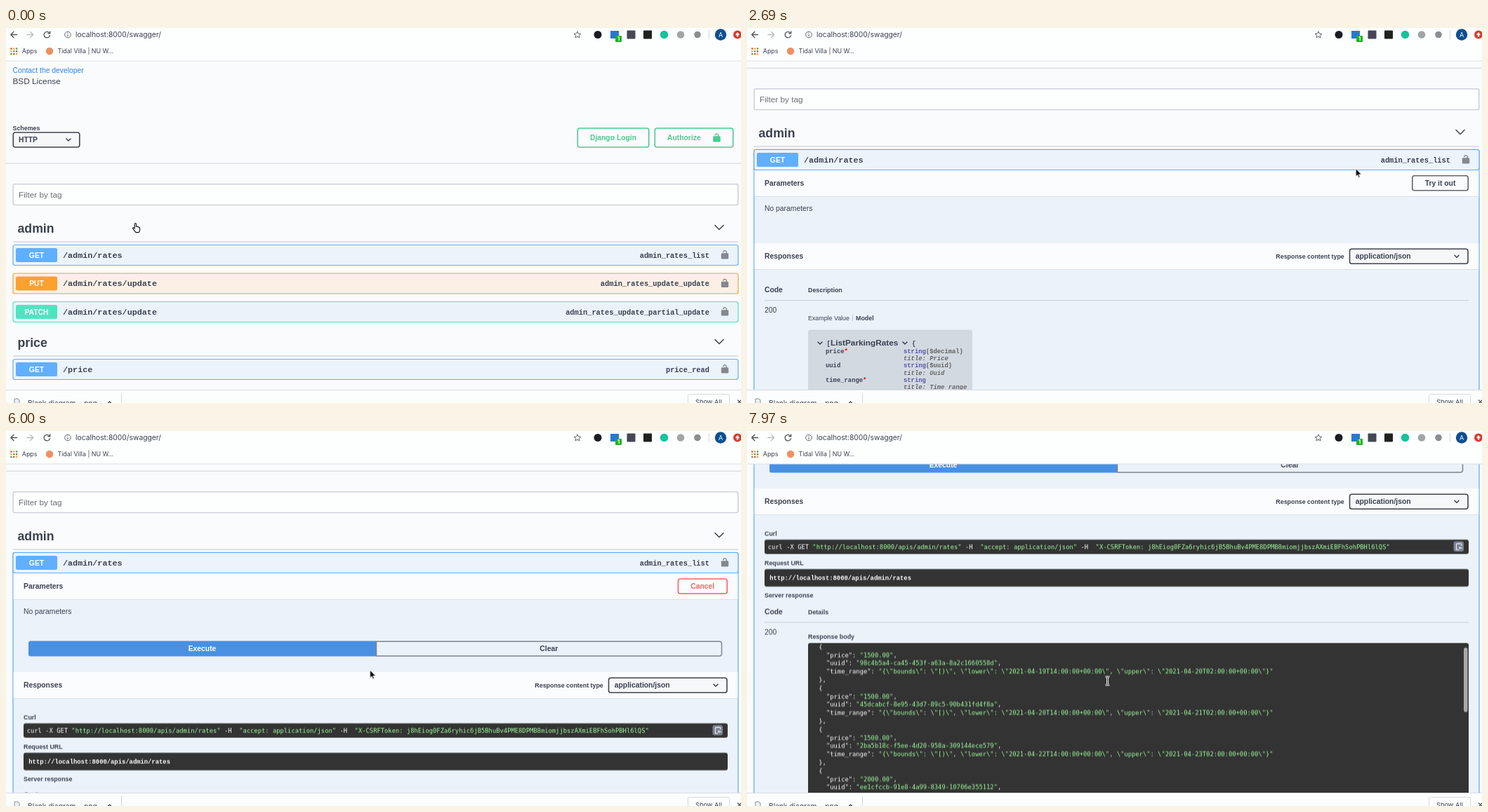
Recreate the animation shown at these times as an HTML page. Size 1047 px wide and 535 px high, loop 8000 ms.

```html
<!DOCTYPE html>
<html lang="en">
<head>
<meta charset="utf-8">
<title>API docs</title>
<style>
html, body { margin: 0; width: 100%; height: 100%; overflow: hidden; background: #fafbfc; }
svg { display: block; }
text { font: 10.35px "Liberation Sans", Arial, sans-serif; fill: #3b4151; white-space: pre; }
.b { font-weight: 700; }
.s { font-size: 8.87px; }
.m { font-size: 11.8px; }
.l { font-size: 17.7px; }
.mid { text-anchor: middle; }
.end { text-anchor: end; }
.ui { font-family: Inter, Roboto, sans-serif; }
.cou { font: 700 8.85px "Liberation Mono", "Courier New", monospace; }
.code { font: 8.82px "DejaVu Sans Mono", monospace; fill: #fff; }
.str { fill: #a2fca2; }
.type { fill: #5555aa; }
.note { fill: #666; font-style: italic; }
.white { fill: #fff; }
.line { fill: none; stroke: #3b4151; stroke-width: 1.5; stroke-linecap: round; stroke-linejoin: round; }
.dark { fill: #333; }
.bar { fill: #fbfcfe; }
.btn { fill: none; stroke: currentColor; stroke-width: 1.6; }
.cur { fill: currentColor; }
.sel { fill: #f5f7f9; stroke: #41444e; stroke-width: 1.6; }

.a { animation: 8s step-end -15ms infinite; }
#page { animation-name: scroll; }
#closed { animation-name: closed; }
#open { animation-name: open; }
#try { animation-name: try; }
#cancel { animation-name: cancel, hover; }
#exec { animation-name: exec; }
#load { animation-name: load; }
#arc { animation-name: spin; }
#resp { animation-name: shift; }
#model { animation-name: model; }
.result { animation-name: result; }
#body { animation-name: inner; }
#cursor { animation-name: move; }
#hand { animation-name: hand; }
#arrow { animation-name: arrow; }
.last { animation-name: last; }

@keyframes scroll {
  0% { transform: translateY(0); }
  1.875% { transform: translateY(-37px); }
  3.75% { transform: translateY(-50px); }
  22.5% { transform: translateY(-80px); }
  24.375% { transform: translateY(-115px); }
  26.25% { transform: translateY(-130px); }
  28.125% { transform: translateY(-136px); }
  78.625% { transform: translateY(-164px); }
  80.5% { transform: translateY(-218.5px); }
  82.75% { transform: translateY(-240px); }
  84.625% { transform: translateY(-248px); }
  88.375% { transform: translateY(-296px); }
  90.25% { transform: translateY(-352px); }
  92.125% { transform: translateY(-386px); }
  94%, to { transform: translateY(-398px); }
}
@keyframes closed { 0% { opacity: 1; } 13.125%, to { opacity: 0; } }
@keyframes open { 0% { opacity: 0; } 13.125%, to { opacity: 1; } }
@keyframes try { 0% { opacity: 1; } 46.625%, to { opacity: 0; } }
@keyframes cancel { 0% { opacity: 0; } 46.625%, to { opacity: 1; } }
@keyframes hover { 0%, 48.5%, to { color: #ff6060; } 46.625% { color: #c0444e; } }
@keyframes exec { 0%, 69.125%, to { opacity: 0; } 46.625% { opacity: 1; } }
@keyframes load { 0%, 69.125%, to { opacity: 0; } 65.25% { opacity: 1; } }
@keyframes spin { 0% { transform: rotate(29deg); } 67.125%, to { transform: rotate(83deg); } }
@keyframes shift {
  0% { transform: translateY(461.5px); }
  46.625% { transform: translateY(488px); }
  65.25% { transform: translateY(573.5px); }
  69.125%, to { transform: translateY(498.5px); }
}
@keyframes model { 0% { opacity: 1; } 69.125%, to { opacity: 0; } }
@keyframes result { 0% { opacity: 0; } 69.125%, to { opacity: 1; } }
@keyframes inner { 0% { transform: none; } 99.625%, to { transform: translateY(-17.5px); } }
@keyframes last { 0% { opacity: 0; } 99.625%, to { opacity: 1; } }
@keyframes move {
  0% { transform: translate(180px, 278px); }
  7.5% { transform: translate(180px, 278px); animation-timing-function: steps(2, jump-start); }
  11.25% { transform: translate(186px, 266px); }
  18.75% { transform: translate(244px, 311px); }
  28.125% { transform: translate(244px, 311px); animation-timing-function: steps(5, jump-start); }
  37.375% { transform: translate(1023px, 173px); animation-timing-function: steps(4, jump-start); }
  44.875% { transform: translate(971px, 216px); }
  48.5% { transform: translate(971px, 216px); animation-timing-function: steps(7, jump-start); }
  61.475% { transform: translate(535px, 301px); }
  71% { transform: translate(535px, 301px); animation-timing-function: steps(4, jump-start); }
  78.65%, to { transform: translate(513px, 354.5px); }
}
@keyframes hand { 0%, 35.5%, 57.8% { opacity: 1; } 18.75%, 48.5%, 72.9%, to { opacity: 0; } }
@keyframes arrow { 0%, 35.5%, 57.8%, 99.625%, to { opacity: 0; } 18.75%, 48.5%, 72.9% { opacity: 1; } }
</style>
</head>
<body>
<svg width="1047" height="535" viewBox="0 0 1047 535">
<defs>
  <g id="lock"><rect x="-5.2" y="-1.2" width="10.4" height="8.2" rx="1.3" class="cur"/><path d="M2.2 0V-2.8A2.3 2.5 0 0 0-2.3-2.8V-2.2" fill="none" stroke="currentColor" stroke-width="1.5"/></g>
  <path id="down" d="M-3-1.5 0 1.5 3-1.5" class="line"/>
  <path id="fold" d="M-6-3 0 3 6-3" class="line"/>
</defs>
<rect width="1047" height="535" fill="#fafbfc"/>

<svg y="47" width="1047" height="469" viewBox="0 47 1047 469">
<g id="page" class="a">
  <text x="9.5" y="63.6" style="fill:#2f82dc">Contact the developer</text>
  <text x="9.5" y="80.3" class="m">BSD License</text>
  <text x="9.5" y="146" class="s b">Schemes</text>
  <rect x="10.3" y="149" width="94.5" height="21" rx="3" class="sel"/>
  <text x="18" y="163.2" class="b">HTTP</text>
  <use href="#down" x="89" y="159.5"/>
  <g color="#49cc90">
    <rect x="814.3" y="143" width="101.4" height="27" rx="3" class="btn"/>
    <rect x="924.3" y="143" width="111.4" height="27" rx="3" class="btn"/>
    <text x="865" y="160.1" class="b mid cur">Django Login</text>
    <text x="942" y="160.1" class="b cur">Authorize</text>
    <use href="#lock" x="1012.5" y="155.5"/>
  </g>
  <rect y="192.5" width="1047" height="1.5" fill="#dee1e5"/>
  <rect x="10.2" y="222.8" width="1032.6" height="29.6" rx="2.5" fill="#fdfefe" stroke="#cdd2dd" stroke-width="1.5"/>
  <text x="18" y="241.6" class="m" style="fill:#6c6f75">Filter by tag</text>
  <text x="16.5" y="292.1" class="b l">admin</text>
  <use href="#fold" x="1016" y="284.5"/>
  <rect x="10" y="304.5" width="1033" height="1" fill="#c2c4c9"/>

  <g id="closed" class="a">
    <g id="ops"></g>
    <text x="16.5" y="455.1" class="b l">price</text>
    <use href="#fold" x="1016" y="447.5"/>
    <rect x="10" y="467.5" width="1033" height="1" fill="#c2c4c9"/>
  </g>

  <g id="open" class="a">
    <rect x="10" y="309.5" width="1033" height="900" rx="3" fill="#ebf2fa" stroke="#61affe" stroke-width="1.3"/>
    <rect x="10.7" y="339" width="1031.6" height="37" class="bar"/>
    <rect x="10.7" y="376" width="1031.6" height="1" fill="#dbe1e9"/>
    <text x="25" y="361.1" class="b">Parameters</text>
    <text x="25" y="396.6">No parameters</text>
    <g id="try" class="a" color="#62666f">
      <rect x="947.8" y="346.8" width="79.4" height="21" rx="3" class="btn"/>
      <text x="987.5" y="361.1" class="b mid">Try it out</text>
    </g>
    <g id="cancel" class="a" color="#ff6060">
      <rect x="957.5" y="347" width="69.7" height="21" rx="3" class="btn"/>
      <text x="992.2" y="361.2" class="b mid cur">Cancel</text>
    </g>
    <g id="exec" class="a">
      <rect x="25" y="428.8" width="1003" height="27" rx="3" fill="#c9d5e4"/>
      <rect x="25" y="428" width="1003" height="27" rx="3" fill="#4990e2"/>
      <text x="526.5" y="445.6" class="b mid white">Execute</text>
    </g>
    <g id="load" class="a">
      <g transform="translate(526.5 510.5)">
        <circle r="21.4" fill="none" stroke="#d8dfe8" stroke-width="1.5"/>
        <path id="arc" class="a" d="M-15.1-15.1A21.4 21.4 0 0 1 15.1-15.1" fill="none" stroke="#5e6164" stroke-width="1.6"/>
        <text y="3" class="b mid" style="font-size:7.39px">LOADING</text>
      </g>
    </g>
    <g class="a result">
      <path d="M527 435.5H35a3 3 0 0 0-3 3v16a3 3 0 0 0 3 3H527z" fill="#4990e2"/>
      <path d="M527.5 436.2H1016.5a3 3 0 0 1 3 3v14.8a3 3 0 0 1-3 3H527.5z" fill="none" stroke="#7e848d" stroke-width="1.5"/>
      <text x="279.5" y="450.1" class="b mid white">Execute</text>
      <text x="773.3" y="450.1" class="b mid">Clear</text>
    </g>

    <g id="resp" class="a">
      <rect x="10.7" y="-18.5" width="1031.6" height="37" class="bar"/>
      <rect x="10.7" y="18.5" width="1031.6" height="1" fill="#dbe1e9"/>
      <text x="25" y="3.6" class="b">Responses</text>
      <text x="850.8" y="3.1" class="b s end">Response content type</text>
      <rect x="858.5" y="-10.3" width="168.5" height="21" rx="3" class="sel"/>
      <text x="866.8" y="3.6" class="b">application/json</text>
      <use href="#down" x="1011" y=".3"/>

      <g id="model" class="a">
        <text x="25" y="51.6" class="b">Code</text>
        <text x="87" y="51.1" class="b s">Description</text>
        <rect x="25" y="62.6" width="1003" height="1" fill="#c8ced8"/>
        <text x="25" y="80.6">200</text>
        <text x="87" y="91.1" class="s">Example Value</text>
        <rect x="150" y="83" width="1" height="10" fill="#c3c9d2"/>
        <text x="155" y="91.1" class="b s">Model</text>
        <rect x="87" y="105" width="234" height="140" rx="3" fill="#d3d9e1"/>
        <use href="#down" x="104" y="124"/>
        <text x="113.5" y="127" class="cou">[</text>
        <text x="119" y="127.1" class="b m">ListParkingRates</text>
        <use href="#down" x="225" y="124"/>
        <text x="235" y="127" class="cou">{</text>
        <g id="fields"></g>
      </g>

      <g class="a result">
        <text x="25" y="48.6" class="b s">Curl</text>
        <rect x="25" y="54.5" width="1003" height="20.5" rx="3" class="dark"/>
        <text x="29.7" y="67.7" class="code">curl -X GET <tspan class="str">"http://localhost:8000/apis/admin/rates"</tspan> -H  <tspan class="str">"accept: application/json"</tspan> -H  <tspan class="str">"X-CSRFToken: j8hEiog0FZa6ryhic6jB5BhuBv4PME8DPMB8miomjjbszAXmiEBFhSohPBHl6lQS"</tspan></text>
        <rect x="1006.5" y="57" width="14.5" height="14.5" rx="3" fill="#7d8293"/>
        <path d="M1014 69h-3.6v-8.6h7.4v2.8M1012.3 60.2h3.4M1019 66.3h-4.6m1.8-1.8-1.8 1.8 1.8 1.8" fill="none" stroke="#fff"/>
        <text x="25" y="90.6" class="b s">Request URL</text>
        <rect x="25" y="96.5" width="1003" height="25" rx="3" class="dark"/>
        <text x="32.3" y="111.6" class="cou white">http://localhost:8000/apis/admin/rates</text>
        <text x="25" y="137" class="b s">Server response</text>
        <text x="25" y="161.3" class="b">Code</text>
        <text x="87" y="160.6" class="b s">Details</text>
        <rect x="25" y="172" width="1003" height="1" fill="#c8ced8"/>
        <text x="25" y="190.1">200</text>
        <text x="87" y="196.1" class="b s">Response body</text>
        <rect x="87" y="202" width="941" height="295" rx="3" class="dark"/>
        <svg x="87" y="202" width="941" height="295">
          <g id="body" class="a"></g>
          <rect x="934" y="6.5" width="5.5" height="92" rx="2.7" fill="#a9a9a9" class="a last"/>
        </svg>
      </g>
    </g>
  </g>
  <g id="first"></g>
</g>
</svg>

<g id="toolbar">
  <rect width="1047" height="47" fill="#fdfefe"/>
  <rect y="46.5" width="1047" height="1" fill="#dddfe1"/>
  <path d="M15.5 9.5H7M11 5.3 6.8 9.5 11 13.7" class="line" style="stroke:#505357;stroke-width:1.3"/>
  <path d="M30 9.5h8.500M34.500 5.300 38.700 9.500 34.500 13.700" class="line" style="stroke:#b9bcbf;stroke-width:1.3"/>
  <path d="M62 7.200A4.300 4.300 0 1 0 62.600 10.600M62.700 4.800V7.800H59.700" class="line" style="stroke:#505357;stroke-width:1.3"/>
  <circle cx="88" cy="9.5" r="4.300" fill="none" stroke="#5f6368"/>
  <path d="M88 9v3M88 6.800v1.100" stroke="#5f6368" stroke-width="1.100"/>
  <text x="99" y="13.200" class="ui" style="font-size:10.300px">localhost:8000/swagger/</text>
  <path d="M814 4.800 815.400 8 818.900 8.300 816.200 10.600 817 14 814 12.200 811 14 811.800 10.600 809.100 8.300 812.600 8z" fill="none" stroke="#5f6368"/>
  <circle cx="843" cy="9.500" r="5.500" fill="#1c1d22"/>
  <rect x="861" y="4" width="12" height="11" fill="#2878d0"/>
  <rect x="868" y="11" width="9" height="9" rx="1" fill="#21b321"/>
  <text x="872.500" y="18.300" class="ui mid white b" style="font-size:7.500px">1</text>
  <rect x="884.500" y="3.500" width="12" height="12" rx="1" fill="#454754"/>
  <rect x="908" y="3.500" width="12" height="12" rx="1" fill="#20221f"/>
  <circle cx="937.500" cy="9.500" r="5.700" fill="#15c39a"/>
  <circle cx="961" cy="9.500" r="5.300" fill="#a2a4a6"/>
  <circle cx="985" cy="9.500" r="4.800" fill="#8b8e91"/>
  <rect x="1001" y="3" width="1" height="13" fill="#d5d7d9"/>
  <circle cx="1018" cy="9.500" r="8.200" fill="#0d4f8f"/>
  <text x="1018" y="12.800" class="ui mid white" style="font-size:9px">A</text>
  <circle cx="1042" cy="9.500" r="6" fill="#d93a2f"/>
  <path d="M1042 6 1038.800 9.700H1040.800V12.500H1043.200V9.700H1045.200z" fill="#fff"/>
  <g id="grid"></g>
  <text x="22.800" y="36.300" class="ui s">Apps</text>
  <circle cx="62" cy="33" r="5.200" fill="#ee8f62"/>
  <text x="73.500" y="36.300" class="ui s">Tidal Villa | NU W...</text>
</g>

<g id="shelf">
  <rect y="516" width="1047" height="19" fill="#fcfdfd"/>
  <rect y="516" width="1047" height="1" fill="#dadcde"/>
  <path d="M12 529h5l2 2v6h-7z" fill="#eceef0" stroke="#8d9196"/>
  <text x="31" y="538.500" class="ui" style="font-size:10.200px">Blank diagram....png</text>
  <path d="M144.500 536 147.500 533 150.500 536" class="line" style="stroke-width:1.200"/>
  <rect x="164" y="521" width="1" height="14" fill="#d3d5d8"/>
  <rect x="971.500" y="522.500" width="59" height="22" rx="2" fill="#fdfefe" stroke="#d9dbde"/>
  <text x="1001" y="536.500" class="ui mid" style="font-size:9.300px">Show All</text>
  <path d="M1042 530.500 1047.500 536M1047.500 530.500 1042 536" stroke="#555" stroke-width="1.200"/>
</g>

<g id="cursor" class="a">
  <path id="hand" class="a" d="M3.200 8V1.600a1.100 1.100 0 0 1 2.200 0V5.200q1.800-.6 2 .5 1.400-.5 1.700.6 1.500-.2 1.500 1.200V10q0 3-1.600 3.600H5Q3.500 12 1 8.600q-.9-1.400.4-1.700 1 0 1.800 1.100z" fill="#fff" stroke="#111" stroke-width="1.100"/>
  <path id="arrow" class="a" d="M0 0V11.300L2.600 8.900 4.400 13 6.200 12.200 4.400 8.300H8z" fill="#000" stroke="#fff" stroke-width=".9"/>
  <g class="a last" fill="none">
    <path id="beam" d="M-2.200-4q2 0 2.700 1.200Q1.200-4 3.200-4M.5-2.800V6.800M-2.200 8q2 0 2.700-1.200Q1.200 8 3.200 8M-1 3H2" stroke="#fff" stroke-width="2.400"/>
    <use href="#beam" style="stroke:#000"/>
    <path d="M.5-2.800V6.800M-2 8q2 0 2.500-1.200Q1 8 3 8M-2-4q2 0 2.500 1.200Q1-4 3-4" stroke="#111" stroke-width=".9"/>
  </g>
</g>
</svg>
<script>
const put = (id, html) => { document.getElementById(id).innerHTML = html; };

const op = (y, color, bg, method, path, id) => `
  <rect x="10" y="${y}" width="1033" height="29" rx="3" fill="${bg}" stroke="${color}" stroke-width="1.2"/>
  <rect x="14" y="${y + 4.5}" width="59" height="20" rx="2.2" fill="${color}"/>
  <text x="43.5" y="${y + 18.2}" class="b mid white">${method}</text>
  <text x="81" y="${y + 18.2}" class="cou" style="font-size:11.76px">${path}</text>
  <text x="1002" y="${y + 18}" class="cou end" style="font-size:10.35px">${id}</text>
  <use href="#lock" x="1024" y="${y + 13}" color="#85898f"/>`;

put('first', op(309.5, '#61affe', '#ebf3fb', 'GET', '/admin/rates', 'admin_rates_list'));
put('ops',
  op(350, '#fca130', '#fcf0e6', 'PUT', '/admin/rates/update', 'admin_rates_update_update') +
  op(390.5, '#50e3c2', '#ebf3f8', 'PATCH', '/admin/rates/update', 'admin_rates_update_partial_update') +
  op(472.5, '#61affe', '#ebf3fb', 'GET', '/price', 'price_read'));

const field = ([name, star, type, format, title], i) => {
  const y = 138.2 + i * 20.6;
  return `<text x="112" y="${y}" class="cou">${name}<tspan fill="red">${star}</tspan></text>
    <text x="223" y="${y}" class="cou"><tspan class="type">${type}</tspan><tspan fill="#606060">${format}</tspan></text>
    <text x="223" y="${y + 10.3}" class="cou note">title: ${title}</text>`;
};
put('fields', [
  ['price', '*', 'string', '($decimal)', 'Price'],
  ['uuid', '', 'string', '($uuid)', 'Uuid'],
  ['time_range', '*', 'string', '', 'Time range']
].map(field).join(''));

const esc = s => `\\"${s}\\"`;
const pair = (key, value) => `    "${key}": <tspan class="str">"${value}"</tspan>`;
const range = day => `{${esc('bounds')}: ${esc('[)')}, ${esc('lower')}: ${esc(`2021-04-${day}T14:00:00+00:00`)}, ` +
  `${esc('upper')}: ${esc(`2021-04-${day + 1}T02:00:00+00:00`)}}`;
const rows = ['['];
for (const [price, uuid, day] of [
  ['1500.00', '98c4b5a4-ca45-453f-a63a-8a2c1660558d', 19],
  ['1500.00', '45dcabcf-8e95-43d7-89c5-90b431fd4f8a', 20],
  ['1500.00', '2ba5b18c-f5ee-4d20-958a-309144ece579', 22],
  ['2000.00', 'ee1cfccb-91e8-4a99-8349-10706e355112', 23]
]) rows.push('  {', pair('price', price) + ',', pair('uuid', uuid) + ',', pair('time_range', range(day)), '  },');
put('body', rows.map((row, i) => `<text x="4.7" y="${14 + i * 11.8}" class="code">${row}</text>`).join(''));

const hues = ['#e8453c', '#f2a33a', '#3aa757'];
put('grid', Array.from({ length: 9 }, (_, i) =>
  `<rect x="${6.3 + i % 3 * 3.8}" y="${28.3 + (i / 3 | 0) * 3.8}" width="2.3" height="2.3" fill="${hues[(i + (i / 3 | 0)) % 3]}"/>`).join(''));
</script>
</body>
</html>
```
